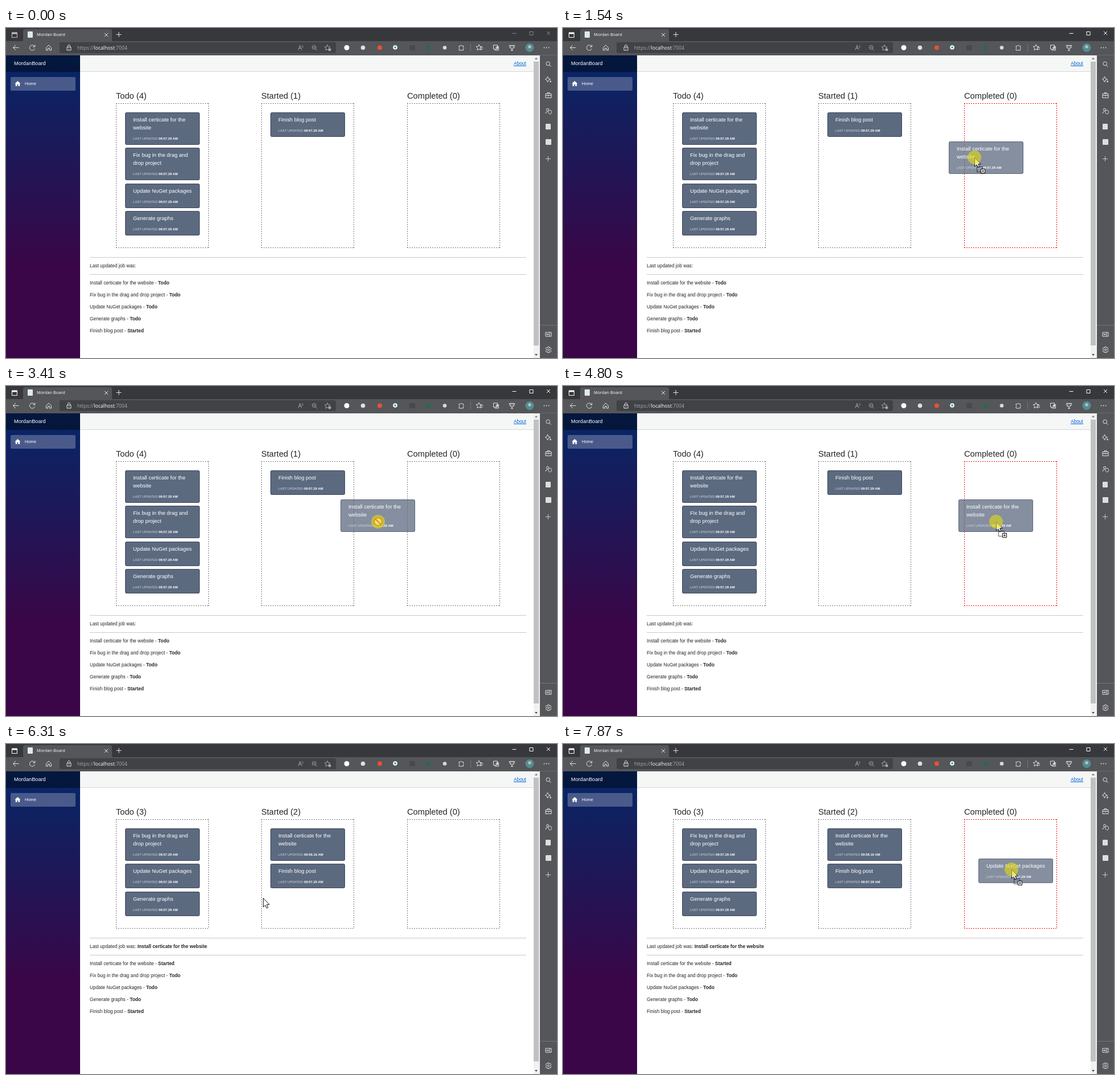
Recreate the animation shown at these times as an HTML page with a canvas. Size 967x579 px, loop 8 s.

```html
<!DOCTYPE html>
<html lang="en">
<head>
<meta charset="utf-8">
<title>Mordan Board</title>
<style>
html, body { margin: 0; width: 100%; height: 100%; overflow: hidden; background: #fff; }
canvas { display: block; }
</style>
</head>
<body>
<canvas id="stage" width="967" height="579"></canvas>
<script>
const ctx = document.getElementById('stage').getContext('2d');
const LOOP = 8000;
const SANS = '"Liberation Sans", Arial, sans-serif';
const UI = '"Open Sans", "Noto Sans", sans-serif';
const BASE = 8.37, INK = '#212529', PALE = '#e2e2e3';
const COL_X = [193, 448, 704], COL_W = 163, COL_TOP = 132;
const CARD_W = 131;
const STATUS = ['Todo', 'Started', 'Completed'];

const jobs = [
  ['Install certicate for the website', ['Install certicate for the', 'website']],
  ['Fix bug in the drag and drop project', ['Fix bug in the drag and', 'drop project']],
  ['Update NuGet packages', ['Update NuGet packages']],
  ['Generate graphs', ['Generate graphs']],
  ['Finish blog post', ['Finish blog post']]
].map(([name, lines]) => ({ name, lines, h: lines.length > 1 ? 57 : 43 }));

// Pointer moves: start, end, steps, points
const moves = [
  [470, 950, 9, [[877, 528], [254, 176]]],
  [1220, 1590, 7, [[254, 176], [759, 231]]],
  [2620, 2980, 7, [[742, 230], [275, 187]]],
  [3280, 3470, 4, [[275, 187], [396, 216], [653, 238], [657, 246]]],
  [3650, 3710, 2, [[715, 241], [785, 236]]],
  [4800, 5000, 4, [[760, 238], [672, 252], [560, 264], [492, 267]]],
  [5170, 5360, 4, [[496, 270], [500, 272], [513, 273], [521, 273]]],
  [6310, 6498, 4, [[451, 270], [350, 250], [285, 233], [267, 229]]],
  [6623, 7060, 8, [[275, 229], [894, 225]]],
  [7180, 7560, 7, [[885, 225], [744, 222]]],
  [7740, 7870, 3, [[752, 222], [770, 221], [787, 220]]]
];

// Drags: press, release, job, grab point
const drags = [
  [1220, 2320, 0, [254, 176]],
  [3280, 5590, 0, [275, 187]],
  [6560, LOOP, 2, [267, 229]]
];

const ease = u => u * u * (3 - 2 * u);

function pointerAt(t) {
  const move = moves.filter(m => m[0] <= t).pop();
  if (!move) return null;
  const [t0, t1, n, pts] = move;
  const i = Math.min(n - 1, Math.floor((t - t0) / (t1 - t0) * (n - 1) + 0.12));
  if (pts.length === n) return pts[i];
  const u = ease(i / (n - 1));
  return [0, 1].map(k => Math.round(pts[0][k] + (pts[1][k] - pts[0][k]) * u));
}

function layout(moved) {
  const columns = moved ? [[1, 2, 3], [0, 4], []] : [[0, 1, 2, 3], [4], []];
  const cards = [];
  columns.forEach((ids, col) => {
    let y = 148.2;
    for (const id of ids) {
      cards.push({ id, col, x: COL_X[col] + 16, y: Math.round(y) });
      y += jobs[id].h + 5.2;
    }
  });
  return { columns, cards, bottom: moved ? 323 : 385 };
}

function rect(x, y, w, h, color, r = 0) {
  ctx.fillStyle = color;
  ctx.beginPath();
  ctx.roundRect(x, y, w, h, r);
  ctx.fill();
}

function disc(x, y, r, color) {
  ctx.fillStyle = color;
  ctx.beginPath();
  ctx.arc(x, y, r, 0, 7);
  ctx.fill();
}

// Draws runs of [string, color, bold]; y is the middle of the capitals
function text(x, y, size, runs, font = SANS) {
  for (const [str, color, bold] of runs) {
    ctx.font = `${bold ? 'bold ' : ''}${size}px ${font}`;
    ctx.fillStyle = color;
    ctx.fillText(str, x, y + size * 0.36);
    x += ctx.measureText(str).width;
  }
}

function icon(d, x, y, color = PALE, fill = false, width = 1) {
  const path = new Path2D(d);
  ctx.save();
  ctx.translate(x, y);
  ctx.lineWidth = width;
  ctx.fillStyle = ctx.strokeStyle = color;
  fill ? ctx.fill(path) : ctx.stroke(path);
  ctx.restore();
}

const CROSS = 'M-3-3L3 3M3-3L-3 3';
const PLUS = 'M-4.5 0H4.5M0-4.5V4.5';
const STAR = 'M0-5L1.5-1.6 5-1.2 2.4 1.2 3.1 4.7 0 3-3.1 4.7-2.4 1.2-5-1.2-1.5-1.6Z';
const HOUSE = 'M-4.5 0L0-4.5 4.5 0V4.5H1.5V1H-1.5V4.5H-4.5Z';
const LENS = 'M3 0A3.3 3.3 0 1 1-3.6 0A3.3 3.3 0 1 1 3 0M2 2.5L5 5.5';

function browser(active) {
  rect(0, 0, 967, 48, '#37383b');
  rect(30, 2, 156, 24, '#54565a', [4, 4, 0, 0]);
  rect(0, 23, 967, 25, '#54565a');
  rect(94, 25, 485, 19, '#404246', 3);
  const lit = active ? '#fff' : '#c4c4c5', win = active ? '#fff' : '#85868a';
  icon('M-4.5-4H4.5V4.5H-4.5Z', 15, 12, lit);
  rect(11, 8, 9, 2.5, lit);
  rect(38, 6, 9, 11, '#dfe9ef', 1);
  text(54, 11.5, 7.36, [['Mordan Board', '#fff']], UI);
  icon(CROSS, 176, 12);
  icon(PLUS, 198, 11.5);
  icon('M-3.5 0H3.5', 892, 9.5, win);
  icon('M-3-3H3V3H-3Z', 922, 9.5, win);
  icon(CROSS, 952, 9, win);

  icon('M5 0H-5M-.5-4.5L-5 0-.5 4.5', 17.5, 34.5);
  icon('M4.4-1.5A4.6 4.6 0 1 0 4.5 1.5M4.8-5V-1.5H1.3', 46, 34.5);
  icon(HOUSE, 75, 34.5);
  icon('M-3.5-1H3.5V4.5H-3.5ZM-2-1V-3A2 2 0 0 1 2-3V-1M0 1V2.5', 110.5, 34.5);
  text(125, 34.5, 8.67, [['https://', '#a9aaac'], ['localhost', '#fff'], [':7004', '#a9aaac']], UI);
  icon('M-4 4L-1-4 2 4M-3 1H1M3-4Q5-2 3.5 0', 517, 34.5, '#a5a6a8');
  icon(LENS + 'M-2 0H1.5', 541, 34, '#a5a6a8');
  icon(STAR, 564, 34.5, '#a5a6a8');
  disc(568, 38, 2.5, '#a5a6a8');

  disc(598, 34.5, 4.5, '#fff');
  disc(626.5, 34.5, 3.8, '#e0e0e0');
  disc(656, 34.5, 4, '#e8512f');
  disc(683, 34, 3.8, '#fff');
  disc(683, 34, 1.8, '#1a9aa8');
  rect(708, 30, 10, 9, '#47494b');
  disc(741, 34.5, 3.5, '#1d7048');
  disc(770, 34.5, 3.3, '#d8d8d8');
  icon('M-4-3H-1.5A1.6 1.6 0 0 1 1.5-3H3.5V-.8A1.6 1.6 0 0 1 3.5 2V4.5H-4V2A1.6 1.6 0 0 0-4-.8Z', 799, 34.5);
  rect(815, 28, 1, 13, '#74767a');
  icon(STAR, 830, 34);
  icon('M1-1H6M2 2H6', 831, 35);
  icon('M-4.5-4.5H2.5V2.5H-4.5ZM-2 2.5V4.5H4.5V-2H2.5M-1 0H4M1.5-2.5V2.5', 860, 34.5);
  icon('M-4.5-4H4.5V-1L1.5 2H-1.5L-4.5-1ZM-2-4V1M2-4V1M0 2V5M-2 5H2', 888, 34.5);
  disc(919, 34.5, 7.5, '#568b91');
  disc(919, 33, 2.7, '#a9c9c5');
  for (const x of [944.5, 948.5, 952.5]) disc(x, 34.5, 0.9, PALE);
}

function rightBar() {
  rect(937, 47, 30, 532, '#54565a');
  rect(937, 47, 30, 1, '#696b6f');
  icon(LENS, 951.5, 62.5);
  icon('M-1-5L.5-1.5 4 0 .5 1.5-1 5-2.5 1.5-5 0-2.5-1.5ZM4 2V5.5M2.3 3.8H5.7', 951.5, 90);
  icon('M-5-2.5H5V4.5H-5ZM-2-2.5V-4.5H2V-2.5M-5 .5H5M0-.5V2', 952, 118);
  icon('M.5-2.3A2 2 0 1 1-3.5-2.3A2 2 0 1 1 .5-2.3M-5 4.5Q-5 1-1.5 1M5.5 2A2.8 2.8 0 1 1 0 2A2.8 2.8 0 1 1 5.5 2', 952, 145.5);
  rect(947, 168, 9, 10, '#dedede', 1);
  rect(947, 195, 10, 10, '#dedede', 1);
  icon(PLUS, 951.5, 229.5, '#c8c8ca');
  rect(937, 521, 30, 1, '#74767a');
  icon('M-5-3.5H5V3.5H-5ZM2-3.5V3.5M-4 0H0M-1.5-1.5L0 0-1.5 1.5', 952, 537.5);
  icon('M1.6 0A1.6 1.6 0 1 1-1.6 0A1.6 1.6 0 1 1 1.6 0M-1.2-5H1.2L1.7-3.4 3.4-4 4.8-2 3.7-.8V.8L4.8 2 3.4 4 1.7 3.4 1.2 5H-1.2L-1.7 3.4-3.4 4-4.8 2-3.7.8V-.8L-4.8-2-3.4-4-1.7-3.4Z', 952, 564.5);
}

function pageFrame() {
  rect(130, 48, 796, 531, '#fff');
  rect(130, 48, 796, 29, '#f5f7f7');
  rect(130, 76, 796, 1, '#d6d5d5');
  text(891, 61.5, BASE, [['About', '#0366d6']]);
  rect(891, 66, 22, 1, '#0366d6');

  const grad = ctx.createLinearGradient(0, 48, 0, 579);
  grad.addColorStop(0, 'rgb(5,39,103)');
  grad.addColorStop(0.7, '#3a0647');
  rect(0, 48, 130, 531, grad);
  rect(0, 48, 130, 29, 'rgba(0,0,0,.4)');
  text(14, 61.5, BASE * 1.1, [['MordanBoard', '#fff']]);
  rect(8, 86, 114, 24, 'rgba(255,255,255,.25)', 2);
  icon('M-5 0L0-4.5 5 0H3.7V4.5H1V1.5H-1V4.5H-3.7V0Z', 20.5, 97.5, '#fff', true);
  text(33, 97.5, BASE * 0.9, [['Home', '#fff']]);

  rect(926, 48, 11, 531, '#f1f1f1');
  rect(926, 59, 9, 498, '#c1c1c1');
  icon('M-2.5 1.5L0-1.5 2.5 1.5Z', 930.5, 53.5, '#777', true);
  icon('M-2.5-1.5L0 1.5 2.5-1.5Z', 930.5, 573.5, '#444', true);
}

function card(id, x, y, time, alpha = 1) {
  const { lines, h } = jobs[id];
  ctx.globalAlpha = alpha;
  rect(x, y, CARD_W, h, '#5c6a80', 3);
  ctx.strokeStyle = 'rgba(20,28,44,.45)';
  ctx.lineWidth = 1;
  ctx.beginPath();
  ctx.roundRect(x + 0.5, y + 0.5, CARD_W - 1, h - 1, 2.5);
  ctx.stroke();
  ctx.globalAlpha = 1;
  lines.forEach((line, i) => text(x + 14, y + 12.5 + i * 14.3, BASE * 1.125, [[line, '#fff']]));
  text(x + 14, y + h - 10.7, 5.8, [['LAST UPDATED ', '#d3d8de'], [time + ' AM', '#fff', true]]);
}

function dashedBox(x, y, w, h, color) {
  ctx.strokeStyle = color;
  ctx.lineWidth = 1;
  ctx.setLineDash([2, 2]);
  ctx.beginPath();
  for (const dy of [0.5, h - 0.5]) {
    ctx.moveTo(x, y + dy);
    ctx.lineTo(x + w, y + dy);
  }
  for (const dx of [0.5, w - 0.5]) {
    ctx.moveTo(x + dx, y);
    ctx.lineTo(x + dx, y + h);
  }
  ctx.stroke();
  ctx.setLineDash([]);
}

function board(view, over, moved) {
  const { columns, cards, bottom } = view;
  columns.forEach((ids, col) => {
    text(COL_X[col], 118.4, BASE * 1.75, [[`${STATUS[col]} (${ids.length})`, INK]]);
    const color = col !== over ? '#777' : col === 1 ? '#008a00' : '#f00';
    dashedBox(COL_X[col], COL_TOP, COL_W, bottom - COL_TOP + 1, color);
  });
  for (const c of cards) card(c.id, c.x, c.y, moved && c.id === 0 ? '09:58.16' : '09:57.29');

  rect(147, bottom + 17, 766, 1, '#c8c9ca');
  text(147, bottom + 32, BASE, [['Last updated job was: ', INK], [moved ? jobs[0].name : '', INK, true]]);
  rect(147, bottom + 47, 766, 1, '#c8c9ca');
  jobs.forEach((job, i) => {
    const status = STATUS[cards.find(c => c.id === i).col];
    text(147, bottom + 62 + i * 20.9, BASE, [[job.name + ' - ', INK], [status, INK, true]]);
  });
}

function arrow(x, y) {
  const d = 'M.5.5V16L4 12.8 6.6 18 9 16.9 6.6 11.7H11.2Z';
  icon(d, x, y, '#fff', true);
  icon(d, x, y, '#111');
}

function hand(x, y) {
  const d = 'M-4 3L-5.3-4M-1-1L-1.8-7.5M2-1L2.5-7M4.5 1L6-4M-3 5L-8 0M-3 3L4 2M-2 6L3 6';
  ctx.lineCap = ctx.lineJoin = 'round';
  icon(d, x, y, '#111', false, 5);
  icon(d, x, y, '#fff', false, 3.4);
  ctx.lineCap = 'butt';
  ctx.lineJoin = 'miter';
}

function noDrop(x, y) {
  const d = 'M7 0A7 7 0 1 1-7 0A7 7 0 1 1 7 0M-5-5L5 5';
  disc(x, y, 8.3, '#fff');
  icon(d, x, y, '#d8261c', false, 2.2);
}

function copyBadge(x, y) {
  ctx.setLineDash([2, 1]);
  icon('M4.5 16.5H14.5V25.5H4.5Z', x, y, '#111');
  ctx.setLineDash([]);
  rect(x + 11, y + 20, 8, 8, '#111');
  rect(x + 12, y + 21, 6, 6, '#fff');
  icon('M13 24H17M15 22V26', x, y, '#111');
}

function draw(t) {
  const moved = t >= 5590;
  const view = layout(moved);
  const pos = pointerAt(t);
  const drag = drags.find(d => t >= d[0] && t < d[1]);
  const carrying = drag && t >= drag[0] + 60;
  const column = pos && pos[1] > COL_TOP && pos[1] < view.bottom
    ? COL_X.findIndex(x => pos[0] >= x && pos[0] <= x + COL_W) : -1;

  pageFrame();
  board(view, carrying && column > 0 ? column : -1, moved);
  if (pos && carrying) {
    const [, , id, grab] = drag;
    const from = view.cards.find(c => c.id === id);
    card(id, from.x + pos[0] - grab[0], from.y + pos[1] - grab[1], '09:57.29', 0.75);
  }
  browser(t >= 1280);
  rightBar();
  if (!pos) return;

  const [x, y] = pos;
  if (carrying && column < 0) noDrop(x, y);
  else if (carrying) {
    arrow(x, y);
    copyBadge(x, y);
  } else {
    const hover = view.cards.some(c =>
      x >= c.x && x <= c.x + CARD_W && y >= c.y && y <= c.y + jobs[c.id].h);
    (hover ? hand : arrow)(x, y);
  }
  if (drag) disc(x, y, 12, 'rgba(226,217,20,.62)');
}

function tick(now) {
  draw(now % LOOP);
  requestAnimationFrame(tick);
}
requestAnimationFrame(tick);
</script>
</body>
</html>
```
